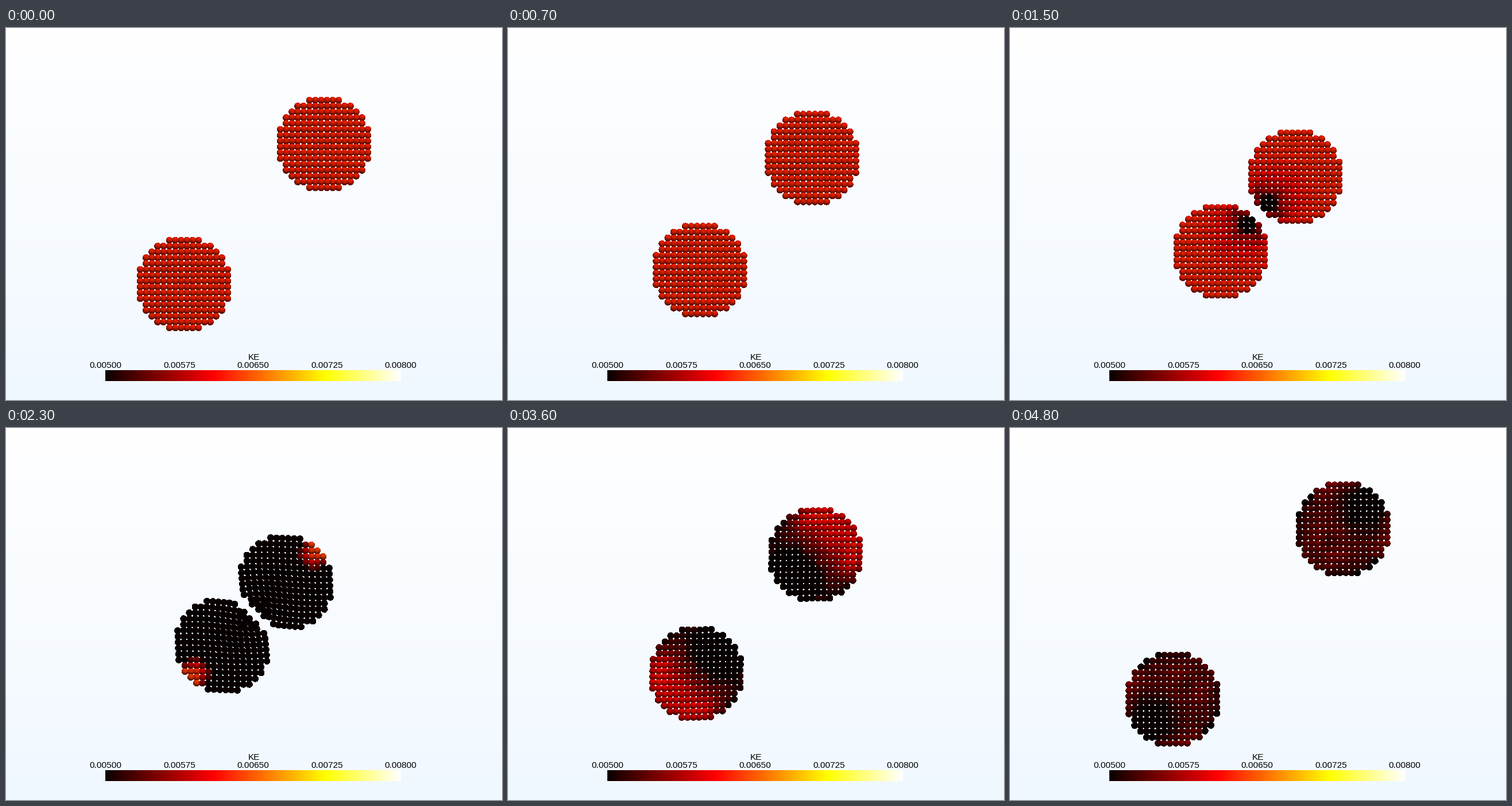
Animation, 864 px wide and 648 px high, one loop 4.9 s. Source, as a matplotlib script:

```python
import numpy as np
import matplotlib.pyplot as plt
from matplotlib.animation import FuncAnimation

W, H = 864, 648
SCALE = 406.67            # pixels per unit length
BALL = 6.0                # ball radius in pixels
KE_MIN, KE_MAX = 0.005, 0.008
FRAMES, INTERVAL = 49, 100

# Material point method: two elastic discs on a bilinear grid
CELL, LOW, NODES = 0.05, -0.2, 30
GAP, RADIUS, SPEED = CELL / 2, 0.2, 0.1
DT, SUBSTEPS, FLIP = 0.001, 100, 0.99
RHO, E, NU = 1000.0, 1000.0, 0.3
LAM = E * NU / ((1 + NU) * (1 - 2 * NU))
MU = E / (2 * (1 + NU))
MASS = RHO * GAP ** 2
SIGN_X = np.array([-1, -1, 1, 1]) / CELL
SIGN_Y = np.array([-1, 1, -1, 1]) / CELL
CORNERS = np.array([0, 1, NODES, NODES + 1])


def make_discs():
    line = (np.arange(16) - 7.5) * GAP
    gx, gy = np.meshgrid(line, line)
    disc = np.array([gx, gy])[:, np.hypot(gx, gy) <= RADIUS]
    x = np.hstack([disc + 0.2, disc + 0.8])
    v = np.hstack([np.full(disc.shape, SPEED), np.full(disc.shape, -SPEED)])
    return x, v


def simulate(count):
    x, v = make_discs()
    n = x.shape[1]
    sxx, syy, sxy = np.zeros((3, n))
    vol = np.full(n, GAP ** 2)
    states = []
    for k in range((count - 1) * SUBSTEPS + 1):
        if k % SUBSTEPS == 0:
            states.append((x.copy(), 0.5 * MASS * (v ** 2).sum(0)))

        # shape functions and gradients
        u = (x - LOW) / CELL
        c = u.astype(int)
        a, b = u - c
        wx = np.stack([1 - a, 1 - a, a, a], 1)
        wy = np.stack([1 - b, b, 1 - b, b], 1)
        w, gx, gy = wx * wy, SIGN_X * wy, SIGN_Y * wx
        node = (c[0] * NODES + c[1])[:, None] + CORNERS
        flat = node.ravel()

        def to_grid(q):
            return np.bincount(flat, q.ravel(), NODES * NODES)

        # particles to grid
        mass = MASS * to_grid(w)
        inv = np.where(mass > 1e-10, 1 / np.maximum(mass, 1e-10), 0)
        old = np.array([to_grid(w * vi[:, None]) for vi in v]) * MASS * inv
        pxx, pyy, pxy = (vol * np.array([sxx, syy, sxy]))[:, :, None]
        force = -np.array([to_grid(pxx * gx + pxy * gy),
                           to_grid(pxy * gx + pyy * gy)])
        new = np.clip(old + DT * force * inv, -0.5, 0.5)

        # grid to particles
        vn = new[:, node]
        pic = (vn * w).sum(-1)
        dv = ((vn - old[:, node]) * w).sum(-1)
        v = (1 - FLIP) * pic + FLIP * (v + dv)
        x = x + DT * pic
        exx, exy = DT * (vn[0] * gx).sum(1), DT * (vn[0] * gy).sum(1)
        eyx, eyy = DT * (vn[1] * gx).sum(1), DT * (vn[1] * gy).sum(1)
        vol = vol * ((1 + exx) * (1 + eyy) - exy * eyx)
        bulk = LAM * (exx + eyy)
        sxx = sxx + bulk + 2 * MU * exx
        syy = syy + bulk + 2 * MU * eyy
        sxy = sxy + MU * (exy + eyx)
    return states


def light(power, elevation, azimuth):
    el, az = np.radians([elevation, azimuth])
    return power, np.cos(el) * np.sin(az), np.sin(el), np.cos(el) * np.cos(az)


LIGHTS = [light(0.75, 50, 10), light(0.25, -75, 0), light(0.25, 0, 0),
          light(0.214, 0, 110), light(0.214, 0, -110)]
HOT = plt.get_cmap("hot")
OY, OX = (g.ravel() for g in np.mgrid[-7:8, -7:8])
FADE = np.linspace(0, 1, H)[:, None, None]
BACK = np.broadcast_to(1 - FADE * (1 - np.array([240, 248, 255]) / 255), (H, W, 3))


def render(x, ke):
    """Shaded balls over the backdrop, nearest surface on top."""
    img = BACK.copy()
    cx = (W / 2 + SCALE * (x[0] - 0.5))[:, None]
    cy = (H / 2 - SCALE * (x[1] - 0.5))[:, None]
    px = np.floor(cx).astype(int) + OX
    py = np.floor(cy).astype(int) + OY
    nx, ny = (px + 0.5 - cx) / BALL, (cy - py - 0.5) / BALL
    z2 = 1 - nx ** 2 - ny ** 2
    hit = (z2 > 0) & (px >= 0) & (px < W) & (py >= 0) & (py < H)
    nz = np.sqrt(np.maximum(z2, 0))
    shade = sum(p * np.maximum(0, lx * nx + ly * ny + lz * nz)
                for p, lx, ly, lz in LIGHTS)
    base = HOT((ke - KE_MIN) / (KE_MAX - KE_MIN))[:, None, :3]
    color = np.minimum(1, base * shade[..., None])
    order = np.argsort(nz[hit], kind="stable")
    img[py[hit][order], px[hit][order]] = color[hit][order]
    return img


STATES = simulate(FRAMES - 1)

fig = plt.figure(figsize=(W / 100, H / 100), dpi=100)
ax = fig.add_axes([0, 0, 1, 1])
ax.axis("off")
scene = ax.imshow(render(*STATES[0]), extent=(0, W, H, 0), aspect="auto",
                  interpolation="nearest")
ax.imshow(np.linspace(0, 1, 256)[None], cmap=HOT, extent=(173, 688, 615, 596),
          aspect="auto", interpolation="nearest")
ax.set_xlim(0, W)
ax.set_ylim(H, 0)


def label(x, y, text):
    ax.text(x, y, text, family="Liberation Sans", size=15.4 * 0.72,
            color="black", ha="center", va="baseline")


label(432, 578.5, "KE")
for i, value in enumerate(np.linspace(KE_MIN, KE_MAX, 5)):
    label(173.5 + 128.5 * i, 591.5, f"{value:.5f}")


def update(i):
    scene.set_data(render(*STATES[max(0, i - 1)]))
    return [scene]


anim = FuncAnimation(fig, update, frames=FRAMES, interval=INTERVAL,
                     repeat=True, repeat_delay=0, blit=False)
plt.show()
```
